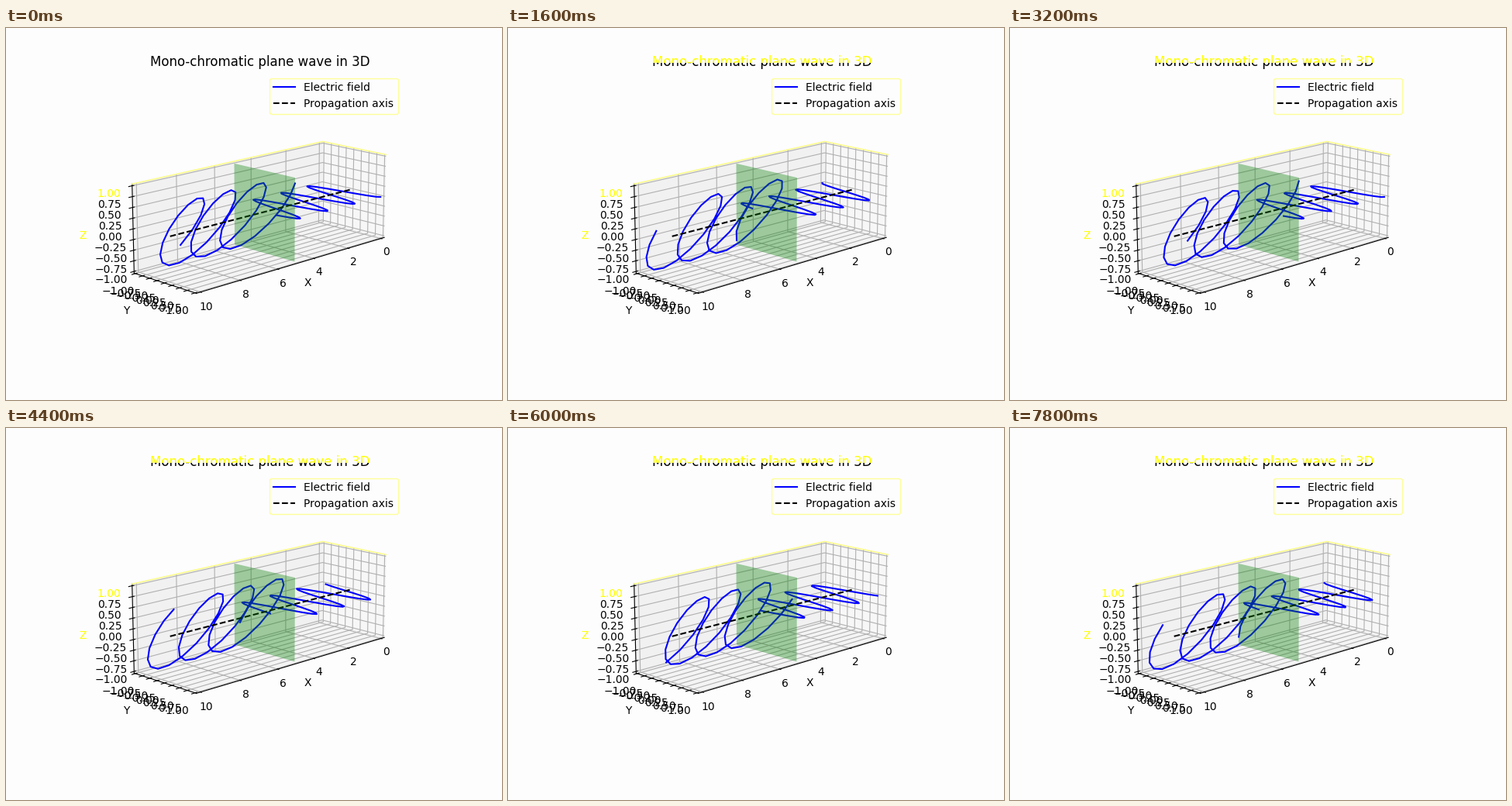
Write a matplotlib script that moves like this. It is 640 px wide and 480 px high and loops after 8 s.

```python
import numpy as np
import matplotlib.pyplot as plt
from matplotlib.animation import FuncAnimation
from matplotlib.transforms import Bbox

W, H, DPI = 640, 480, 100
FRAMES, INTERVAL = 40, 200
PAPER, YELLOW, PALE = "#fdfdfe", "#ffff00", "#ffff80"
K, STEP = 4.0, 0.4            # wave number, phase advance per frame
LENGTH, PLATE = 10.0, 5.0
DELAY = np.pi / 6             # phase lead of the z component behind the plate
PAD = 1 / 48

fig = plt.figure(figsize=(W / DPI, H / DPI), dpi=DPI, facecolor=PAPER)
ax = fig.add_subplot(projection="3d", facecolor=PAPER)
ax.set_box_aspect((3, 1, 1))
ax.view_init(elev=15, azim=45)


def padded(lo, hi):
    d = (hi - lo) * PAD
    return lo - d, hi + d


def title(color, top, bottom):
    """Title text, visible only between two heights measured from the top."""
    t = fig.text(328 / W, 0.88 + 6 / 72 / (H / DPI),
                 "Mono-chromatic plane wave in 3D",
                 ha="center", va="baseline", fontsize=12, color=color)
    t.set_clip_box(Bbox([[0, H - bottom], [W, H - top]]))
    t.set_clip_on(True)
    return t


xlim, ylim = padded(0, LENGTH), padded(-1, 1)
ticks = np.linspace(-1, 1, 9)
ax.set_xticks(np.arange(0, 11, 2))
ax.set_yticks(ticks)
ax.set_zticks(ticks)
ax.set_xlabel("X")
ax.set_ylabel("Y")
ax.set_zlabel("Z", color=YELLOW)
ax.get_zticklabels()[-1].set_color(YELLOW)

# upper rim of the back walls
ax.plot([xlim[1], xlim[0], xlim[0]], [ylim[0], ylim[0], ylim[1]],
        [ylim[1]] * 3, color=PALE, lw=1)

wave, = ax.plot([], [], [], color="blue", lw=1.5, label="Electric field")
ax.plot([0, LENGTH], [0, 0], [0, 0], "k--", lw=1.5, label="Propagation axis")

py, pz = np.meshgrid([-1, 1], [-1, 1])
ax.plot_surface(np.full(py.shape, PLATE), py, pz, color="green", alpha=0.35,
                shade=False, linewidth=0)

ax.set_xlim(*xlim)
ax.set_ylim(*ylim)
ax.set_zlim(*ylim)
ax.legend(loc="upper right", facecolor=PAPER, edgecolor=PALE)

plain = title("black", 0, H)
split = [title(YELLOW, 0, 45), title("black", 45, H)]

x1 = np.linspace(0, PLATE, 50)
x2 = np.linspace(PLATE, LENGTH, 50)
xs = np.concatenate([x1, [np.nan], x2])


def draw(n):
    phase = STEP * n
    after = K * (x2 - PLATE) - phase
    y = np.concatenate([np.cos(K * x1 - phase), [np.nan], np.cos(after)])
    z = np.concatenate([0 * x1, [np.nan], np.cos(after + DELAY)])
    wave.set_data_3d(xs, y, z)
    plain.set_visible(n == 0)
    for t in split:
        t.set_visible(n > 0)
    return [wave, plain, *split]


anim = FuncAnimation(fig, draw, frames=FRAMES, init_func=lambda: draw(0),
                     interval=INTERVAL, repeat=True, repeat_delay=0, blit=False)
plt.show()
```
